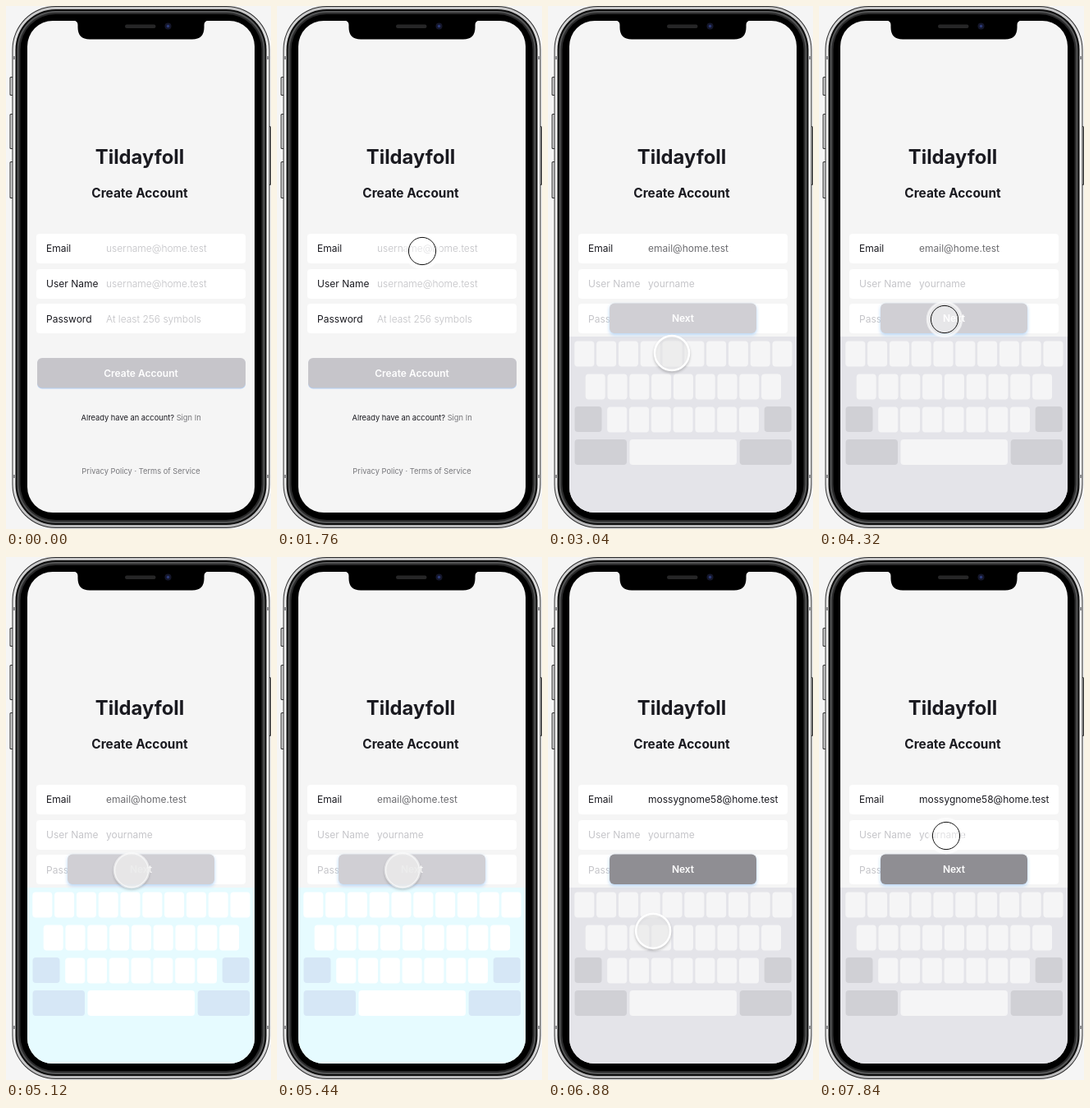
Recreate the animation shown at these times as an HTML page. Size 323 by 636 pixels, loop 8 s.

```html
<!DOCTYPE html>
<html lang="en">
<head>
<meta charset="utf-8">
<title>Sign-up prototype</title>
<style>
  html, body { margin: 0; width: 100%; height: 100%; overflow: hidden; background: #f5f5f5; }
  svg { display: block; width: 323px; height: 636px; font: 12px Inter, "Open Sans", sans-serif; }
  .mid { text-anchor: middle; }
  .dark { fill: #1a1a20; }
  .pale { fill: #c5c5c9; }
  .hint { fill: #c0c0c4; font-weight: 300; }
  .bold { font-weight: 700; }
  .semi { font-weight: 600; fill: #fff; }
  .small { font-size: 9.3px; fill: #77777b; }
  .glow { filter: drop-shadow(0 2px 2px #b5d6f8); }
  .raised { filter: drop-shadow(0 2px 1.5px rgba(0, 0, 0, .22)); }
</style>
</head>
<body>
<svg viewBox="0 0 323 636">
  <defs>
    <clipPath id="screen"><rect x="26" y="18" width="277" height="598" rx="31"/></clipPath>
    <linearGradient id="steel" x2="0" y2="1">
      <stop offset="0" stop-color="#c4c4c5"/>
      <stop offset=".1" stop-color="#f0f0f0"/>
      <stop offset=".9" stop-color="#f0f0f0"/>
      <stop offset="1" stop-color="#b5b5b7"/>
    </linearGradient>
  </defs>

  <g id="body"></g>

  <g clip-path="url(#screen)">
    <rect x="26" y="18" width="277" height="598" fill="#f5f5f5"/>
    <text class="mid dark bold" x="163" y="192" font-size="23.8">Tildayfoll</text>
    <text class="mid dark bold" x="163" y="233" font-size="15.4">Create Account</text>
    <g id="fields" fill="#fff"></g>

    <g id="home">
      <text class="dark" x="49" y="299">Email</text>
      <text class="dark" x="49" y="342">User Name</text>
      <text class="dark" x="49" y="385">Password</text>
      <text class="hint" x="122" y="299">username@home.test</text>
      <text class="hint" x="122" y="342">username@home.test</text>
      <text class="hint" x="122" y="385">At least 256 symbols</text>
      <rect x="38" y="428" width="254" height="36.5" rx="6" fill="#c6c5ca" style="filter:drop-shadow(0 1px .5px #b5d0f5)"/>
      <text class="mid semi" x="164.5" y="450.5">Create Account</text>
      <text class="small" x="91.5" y="504"><tspan class="dark">Already have an account?</tspan> Sign In</text>
      <text class="small mid" x="164.5" y="569">Privacy Policy · Terms of Service</text>
    </g>

    <g id="entry">
      <text class="dark" x="49" y="299">Email</text>
      <text id="email" x="122" y="299"></text>
      <text class="pale" x="49" y="342">User Name</text>
      <text class="pale" x="122" y="342">yourname</text>
      <text class="pale" x="49" y="385">Password</text>
      <rect id="board" x="26" y="402" width="277" height="214"/>
      <g id="keys"></g>
      <g id="sideKeys"></g>
      <rect id="next" class="glow" x="75" y="361.5" width="179" height="36.5" rx="6"/>
      <text class="mid semi" x="164.5" y="384">Next</text>
    </g>
  </g>

  <path d="M82 17.5Q87.5 18 87.5 23V26Q87.5 40.5 102 40.5H227Q241.5 40.5 241.5 26V23Q241.5 18 247 17.5Z"/>
  <rect x="145" y="22.5" width="37.5" height="4.5" rx="2.2" fill="#262627"/>
  <circle cx="197.5" cy="24.5" r="4" fill="#15172c"/>
  <circle cx="197.5" cy="24.5" r="1.7" fill="#2b3a78"/>

  <g id="cursor">
    <circle id="disc" r="21" stroke-width="2.5"/>
    <circle id="ring" r="16.6" fill="none" stroke="#111"/>
  </g>
</svg>

<script>
const LOOP = 8000, STEP = 160;
const $ = id => document.getElementById(id);

function addRect(parent, x, y, width, height, rx, fill) {
  const rect = document.createElementNS('http://www.w3.org/2000/svg', 'rect');
  const attrs = { x, y, width, height, rx };
  if (fill) attrs.fill = fill;
  for (const name in attrs) rect.setAttribute(name, attrs[name]);
  $(parent).append(rect);
}

// Side buttons, then the nested shells of the phone
for (const [x, y, h] of [[4.5, 86, 23], [4.5, 131, 43], [4.5, 189, 45], [318, 146, 72]]) {
  addRect('body', x, y, 5, h, 1.5, '#333');
  addRect('body', x + 1, y + 1, 3, h - 2, 1, '#d5d5d6');
}
const shells = [[0, '#2c2c2d'], [1, 'url(#steel)'], [4, '#0c0c0c'], [6, '#555657'], [8, '#2a2a2b'], [10, '#000']];
for (const [inset, fill] of shells)
  addRect('body', 7.5 + inset, inset, 314 - 2 * inset, 635 - 2 * inset, 53 - inset, fill);
for (const x of [8, 317]) for (const y of [61, 570]) addRect('body', x, y, 4, 4, 0, '#8d8d8f');

for (const y of [277, 320, 362]) addRect('fields', 37, y, 255, 36, 4);

// Keyboard: rows of [first x, top, number of keys]
for (const [x, y, count] of [[32.3, 407.5, 10], [45.7, 447.5, 9], [72.2, 487.5, 7]])
  for (let i = 0; i < count; i++) addRect('keys', x + i * 26.8, y, 24, 31, 4);
addRect('keys', 99.5, 527, 130.5, 31, 4);
for (const [x, y, w] of [[32.5, 487, 33], [263.7, 487, 33], [32.5, 527, 63.5], [233.7, 527, 63.3]])
  addRect('sideKeys', x, y, w, 31, 4);

// Keyframes: [time, values...]
const path = [
  [160, 222, 176], [1280, 177, 298], [2480, 177, 298], [3040, 151, 422], [3200, 142, 455],
  [3520, 168, 392], [3840, 164, 358], [4160, 153, 381], [5600, 153, 381],
  [6080, 130, 443], [6400, 125, 463], [6720, 126, 464], [7680, 155, 339]
];
const flash = [[4480, 0], [5120, 1], [5600, 1], [6080, .62], [6560, 0]];

const clamp = v => Math.min(1, Math.max(0, v));

function sample(frames, t) {
  const i = frames.findIndex(frame => frame[0] > t);
  if (i < 0) return frames.at(-1).slice(1);
  if (i === 0) return frames[0].slice(1);
  const [from, to] = [frames[i - 1], frames[i]];
  const p = (t - from[0]) / (to[0] - from[0]);
  const eased = p * p * (3 - 2 * p);
  return from.slice(1).map((v, k) => v + (to[k + 1] - v) * eased);
}

const mix = (a, b, p) => `rgb(${a.map((v, i) => v + (b[i] - v) * p)})`;

function draw(t) {
  const home = t < 1920, filled = t >= 6400;
  $('home').style.display = home ? '' : 'none';
  $('entry').style.display = home ? 'none' : '';

  $('email').textContent = filled ? 'mossygnome58@home.test' : 'email@home.test';
  $('email').setAttribute('fill', filled ? '#1a1a20' : '#6c6c70');
  $('next').setAttribute('fill', filled ? '#8f8e93' : '#d0cfd4');

  const [lit] = sample(flash, t);
  $('board').setAttribute('fill', mix([228, 228, 233], [230, 251, 255], lit));
  $('keys').setAttribute('fill', mix([245, 245, 246], [255, 255, 255], clamp(lit * 1.6)));
  $('sideKeys').setAttribute('fill', mix([208, 208, 213], [214, 231, 246], lit));

  const tap = t >= 7840 || (t >= 4320 && t < 4640) || (t >= 1760 && t < 1920);
  const pressed = t >= 4640 && t < 6720;
  $('cursor').setAttribute('transform', `translate(${sample(path, t)})`);
  $('cursor').setAttribute('opacity', clamp((t - 160) / 480));
  $('disc').setAttribute('class', tap ? '' : 'raised');
  $('disc').setAttribute('fill', pressed ? 'rgba(241,241,241,.85)' : 'rgba(255,255,255,.5)');
  $('disc').setAttribute('stroke', pressed || tap ? 'rgba(255,255,255,.6)' : '#fff');
  $('ring').style.display = tap ? '' : 'none';
}

const start = performance.now();
function tick() {
  const t = (performance.now() - start) % LOOP;
  draw(Math.floor(t / STEP) * STEP);
  requestAnimationFrame(tick);
}
tick();
</script>
</body>
</html>
```
